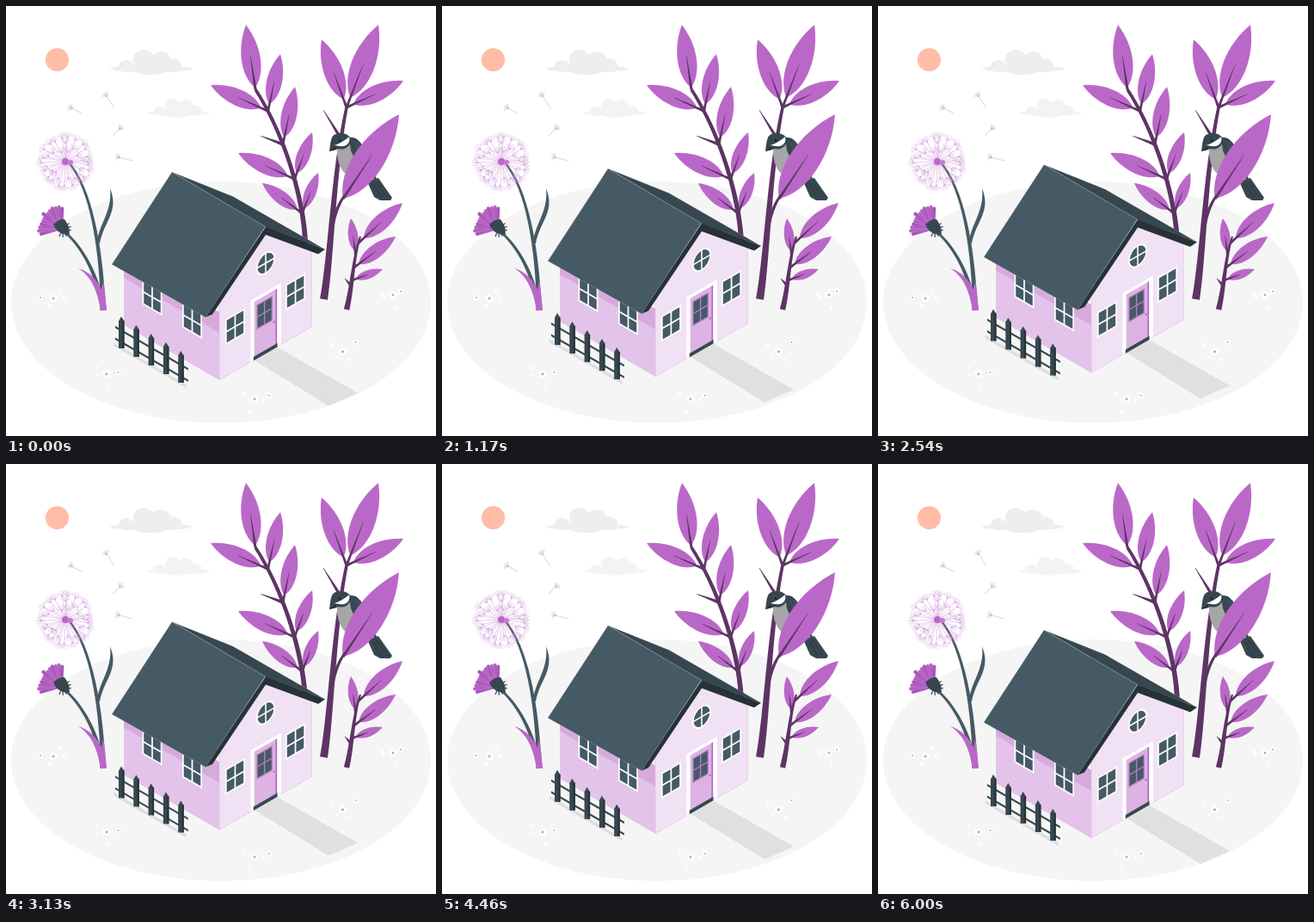
An HTML page that plays this animation: 500 px wide and 500 px high, repeating every 6.04 s.

```html
<!DOCTYPE html>
<html lang="en">
<head>
<meta charset="utf-8">
<title>Floating house</title>
<style>
  html, body { margin: 0; width: 100%; height: 100%; overflow: hidden; background: #fff; }
  svg { display: block; width: 100vw; height: 100vh; }
</style>
</head>
<body>
<svg viewBox="0 0 500 500">
  <g id="scene"></g>
  <g id="house"></g>
</svg>
<script>
const PURPLE = '#ba68c8', STEM = '#5d3464', SLATE = '#455a64', DEEP = '#37474f', INK = '#263238';
const LOOP = 6040, CYCLE = 6000, LIFT = 10;

let seed = 11;
const random = () => (seed = seed * 16807 % 2147483647) / 2147483647;
const repeat = (n, draw) => Array.from({ length: n }, (_, i) => draw(i)).join('');

const polar = ([x, y], angle, r) => [x + Math.cos(angle) * r, y + Math.sin(angle) * r];
const mix = (a, b, t) => a.map((v, i) => v + (b[i] - v) * t);
const str = p => p.map(v => v.toFixed(2)).join();

const path = (d, fill) => `<path d="${d}" fill="${fill}"/>`;
const line = (d, color, width) =>
  `<path d="${d}" fill="none" stroke="${color}" stroke-width="${width}" stroke-linecap="round"/>`;
const poly = (points, fill, extra = '') => `<polygon points="${points}" fill="${fill}" ${extra}/>`;
const rect = (x, y, w, h, fill) => `<rect x="${x}" y="${y}" width="${w}" height="${h}" fill="${fill}"/>`;
const oval = ([x, y], rx, ry, fill) => `<ellipse cx="${x}" cy="${y}" rx="${rx}" ry="${ry}" fill="${fill}"/>`;
const dot = (p, r, fill) => oval(p, r, r, fill);
const skew = (slope, x, y, content) => `<g transform="matrix(.866 ${slope} 0 1 ${x} ${y})">${content}</g>`;

// Point on a Bézier curve of any degree.
function along(curve, t) {
  while (curve.length > 1) curve = curve.slice(1).map((p, i) => mix(curve[i], p, t));
  return curve[0];
}

function taper(curve, from, to, fill) {
  const left = [], right = [];
  for (let t = 0; t < 1.01; t += .05) {
    const p = along(curve, t), q = along(curve, t + .01);
    const normal = Math.atan2(q[1] - p[1], q[0] - p[0]) + Math.PI / 2;
    const r = (from + (to - from) * t) / 2;
    left.push(str(polar(p, normal, r)));
    right.unshift(str(polar(p, normal, -r)));
  }
  return poly([...left, ...right].join(' '), fill);
}

const twig = (from, to) => taper([from, to], 4, .6, STEM);

// Every leaf has the same outline, scaled to its length, and a rib that starts at the node.
function leaf(node, tip, stalk = .12) {
  const base = mix(node, tip, stalk);
  const length = Math.hypot(tip[0] - base[0], tip[1] - base[1]);
  const normal = Math.atan2(tip[1] - base[1], tip[0] - base[0]) + Math.PI / 2;
  const ctrl = (t, side) => str(polar(mix(base, tip, t), normal, side * length * .2));
  return path(`M${str(base)}C${ctrl(.2, 1)} ${ctrl(.65, 1)} ${str(tip)}C${ctrl(.65, -1)} ${ctrl(.2, -1)} ${str(base)}Z`, PURPLE) +
    taper([node, mix(node, tip, .52)], 3.2, .4, STEM);
}

function cloud(x, y, k, fill) {
  const puff = (dx, dy, rx, ry) => oval([x + dx * k, y + dy * k], rx * k, ry * k, fill);
  return puff(0, 0, 48, 4) + puff(-29, -3, 9, 7) + puff(-9, -11, 12, 11) +
    puff(11, -9, 12, 11) + puff(25, -4, 10, 8) + puff(-1, -1, 22, 8);
}

function daisy(p, size, heart) {
  return repeat(5, i => dot(polar(p, i * Math.PI * .4 - 1.57, size), size * .72, '#fff')) +
    dot(p, size * .52, heart);
}

function daisies() {
  const pairs = [[[55,340],[40,339]], [[450,336],[459,332]], [[391.5,402],[406.5,391]],
    [[117,428],[130.5,426]], [[289,457],[306,453]]];
  return pairs.map(([big, small], i) =>
    daisy(big, 2.8, i === 2 ? '#c98bd4' : '#b3a9bb') + daisy(small, 2, '#b0b0b0') +
    repeat(3, () => daisy(polar(big, random() * 6.3, 9 + random() * 8), 1.2, '#fff'))).join('');
}

// Parachute seed: a stalk with a fan of hairs at its end.
function floret(from, to, hair, color) {
  const angle = Math.atan2(to[1] - from[1], to[0] - from[0]);
  const fan = repeat(5, i => `M${str(to)}L${str(polar(to, angle + (i - 2) * .48, hair))}`);
  return line(`M${str(from)}L${str(to)}${fan}`, color, .42);
}

function dandelion(center) {
  return repeat(38, i => {
    const reach = i < 22 ? 25 + random() * 3 : 11 + random() * 11;
    return floret(center, polar(center, i * 2.39996, reach), 6.8, '#c88ad3');
  }) + dot(center, 4, PURPLE) + dot([center[0] + 6, center[1] + 1], 3, '#c37bd0');
}

function thistle(heart) {
  return repeat(13, i => {
    const angle = 2.85 + i * .16, tip = polar(heart, angle, 22 + random() * 5);
    return line(`M${str(heart)}L${str(tip)}`, i % 3 ? PURPLE : '#ad5cbc', 4.2) +
      line(`M${str(polar(heart, angle + .06, 10))}L${str(tip)}`, '#9848a8', .5);
  }) + path('M55 254Q62 247 68 248Q76 259 73 266Q60 266 55 254Z', DEEP) +
    repeat(7, i => line(`M66 259L${str(polar([66, 259], -.7 + i * .45, 9.5))}`, DEEP, 1.2));
}

function meadow() {
  const foot = [113, 354];
  const drifting = [[[88,125],[77,119]], [[126,119],[117,105]], [[124,151],[132,143]], [[147,180],[132,176]]];
  return taper([foot, [112,320], [107,222], [73,182]], 6, 2, SLATE) +
    taper([foot, [108,318], [92,284], [69,263]], 5, 2.6, SLATE) +
    path('M106 276C107 254 124 240 121 212C132 239 114 250 109 276Z', SLATE) +
    path('M110 354C107 337 102 316 84 305C104 311 115 330 117 354Z', PURPLE) +
    path('M109 354Q110 334 113 319Q116 336 117 354Z', PURPLE) +
    dandelion([69, 181]) + thistle([64, 258]) +
    drifting.map(([tail, head]) => floret(tail, head, 5, '#b58abd')).join('');
}

function bird() {
  return path('M420 204L433 200L449 223L447 226L435 226L428 222Z', DEEP) +
    line('M427 206L437 224M431 205L443 222', INK, .7) +
    path('M385 164C384 182 390 197 406 201L419 188L405 159Z', '#a6a6a6') +
    path('M399 153C411 151 417 165 425 184L432 204C418 196 407 183 401 168Z', DEEP) +
    line('M405 158Q411 176 426 195M409 158Q415 176 428 194', SLATE, .9) +
    path('M376 169C377 163 377 156 380 151C387 145 398 148 401 154C402 162 395 168 387 166Z', DEEP) +
    path('M382 162Q391 159 399 152C401 160 395 164 388 163Z', '#fff') +
    path('M376 169L383 163L384 167Z', INK) + dot([388, 156.5], 1.2, '#111b1f') +
    line('M403 195L401 202M407 196L405 203', INK, 1.3);
}

function plants() {
  const tall = [[348,275], [346,222], [323,148], [290,97]];
  const wide = [[369.5,341], [378,290], [381,190], [396,118]];
  const low = [[396,353], [403,325], [403,296], [412,268]];
  const tallNode = i => along(tall, .2 + i * .215);
  const tallLeaves = [
    [[298,206], [363,194]], [[270,171], [356,147]], [[336,94]], [[238,92], [319,56]]];
  const crown = [[367,39], [433,22], [462,87]];
  const lowLeaves = [[438,306], [453,268], [401,247], [461,229]];
  return tallLeaves.map((tips, i) => tips.map(tip => leaf(tallNode(i), tip)).join('')).join('') +
    leaf(tall[3], [279, 22], .03) + taper(tall, 6, 3.6, STEM) + twig(tallNode(2), [296, 151]) +
    crown.map(tip => leaf(wide[3], tip)).join('') +
    taper(wide, 9, 3.6, STEM) + twig(along(wide, .84), [369, 121]) +
    lowLeaves.map((tip, i) => leaf(along(low, .4 + i * .17), tip)).join('') +
    taper(low, 6.5, 2, STEM) + twig(along(low, .33), [394, 317]) +
    bird() + leaf([392, 224], [457, 126], 0) + taper([[380,253], [385,232], [394,220]], 4, 2.8, STEM);
}

function panes(x, y, w, h, bar, gap) {
  const pw = (w - gap * 3) / 2, ph = (h - gap * 3) / 2;
  return rect(x, y, w, h, bar) + repeat(4, i =>
    rect(x + gap + (i % 2) * (pw + gap), y + gap + (i >> 1) * (ph + gap), pw, ph, SLATE));
}

function fence() {
  const post = rect(0, 4, 6.5, 32, DEEP) + poly('0,4.500 3,-1 6.500,4.500', DEEP) + rect(4.5, 4, 2, 32, INK);
  return skew(.5, 123, 392, rect(2, -2, 98, 4, '#dedede')) +
    skew(.5, 127, 372, rect(0, 0, 98, 2.4, DEEP) + rect(0, 13.5, 98, 2.4, DEEP)) +
    repeat(5, i => `<g transform="translate(${131 + i * 17.3} ${362 + i * 10})">${post}</g>`);
}

function house() {
  const trim = 'stroke="#fff" stroke-opacity=".35" stroke-width=".5"';
  const side = rect(-128, -79, 128, 79, '#e3c3e9') + rect(-128, -79, 128, 24, '#d7aade') +
    [-103.3, -49.6].map(x => panes(x, -66.5, 26.5, 30, '#fff', 2)).join('');
  const front = poly('0,0 0,-88 62,-144 124,-90 124,0', '#f1e1f4', 'stroke="#d9b8e0" stroke-width=".5"') +
    [8, 89].map(x => panes(x, -66.5, 26.5, 30, '#fff', 2)).join('') +
    rect(42, -71.5, 41, 71.5, '#fff') + rect(47, -67.5, 30.5, 64, '#dcb3e3') +
    rect(75.5, -67.5, 2, 64, PURPLE) + rect(46, -4, 32, 4.5, DEEP) +
    panes(50, -62.5, 21.5, 29, '#b77cc3', 1.5) + dot([73.5, -31], 1, '#8b4e97');
  const porthole = dot([0, 0], 12.8, '#fff') + dot([0, 0], 10.8, SLATE) + line('M-11 0H11M0 -11V11', '#fff', 1.8);
  return poly('289,412 316,397 409,450 375,465', '#e0e0e0') +
    skew(.5, 248, 435, side) + skew(-.5, 248, 435, front) + skew(-.5, 302, 299, porthole) +
    poly('193,193 264,221.500 371,283 302,257', DEEP, trim) +
    poly('302,256.500 371,283 363,288.500 302,266', INK) +
    poly('302,256.500 302,266 240,358.500 231.500,362', INK) +
    poly('193,193 301.500,256.500 232,362 123,300.500', SLATE, trim) +
    fence();
}

document.getElementById('scene').innerHTML =
  dot([59.5, 62.5], 13.6, '#ffbda7') + cloud(169, 73, 1, '#eeeeee') + cloud(201, 124.5, .76, '#f3f3f3') +
  oval([250, 344.5], 244, 140.5, '#f5f5f5') + daisies() + meadow() + plants();
const home = document.getElementById('house');
home.innerHTML = house();

const start = performance.now();
function frame(now) {
  const t = Math.min(Math.max(0, now - start) % LOOP, CYCLE);
  const lift = LIFT * (1 - Math.abs(1 - 2 * t / CYCLE));
  home.setAttribute('transform', `translate(0 ${-lift.toFixed(3)})`);
  requestAnimationFrame(frame);
}
frame(start);
</script>
</body>
</html>
```
